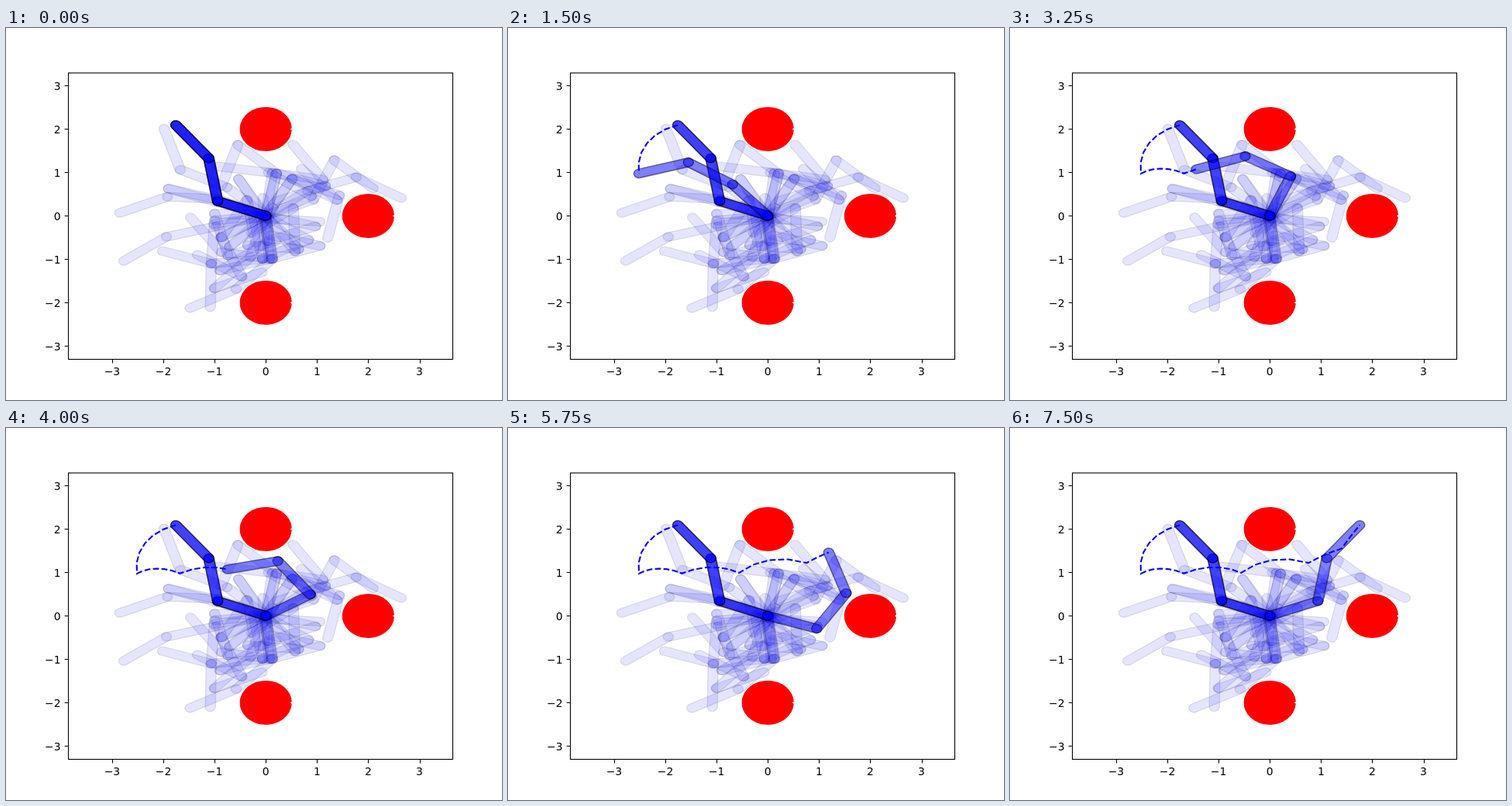
Write an HTML page with a canvas that moves like this. It is 640 px wide and 480 px high and loops after 7750 ms.

```html
<!DOCTYPE html>
<html>
<head>
<meta charset="utf-8">
<style>
  html, body { margin: 0; overflow: hidden; background: #fff; }
  canvas { display: block; }
</style>
</head>
<body>
<canvas id="stage" width="640" height="480"></canvas>
<script>
const ctx = document.getElementById('stage').getContext('2d');
const STEP = 250, STEPS = 31, RADIUS = 0.1;
const BLUE = '#0000ff';
const px = x => 335.2 + 66.1 * x;
const py = y => 242.4 - 56 * y;
const rad = deg => deg * Math.PI / 180;

// Absolute link angles (degrees) of the sampled poses.
const samples = [
  [139, 156, 108.6], [157.2, 177, 201.8], [161.7, 161.7, -15], [194, 194, 213.7],
  [-93.8, 186, 163], [185.9, -94, -91], [-82.2, 224.3, 205.8], [-107.6, 225.7, 21.8],
  [209.1, -66.2, 149.8], [-86, 195.2, 35], [35.4, 18.1, -28.6], [21.8, 65.9, -40.7],
  [59.1, -22.8, -103], [58.8, -29.3, 134], [82.6, -9.3, 125.7], [78, -17, 200],
  [78, 138.7, -109], [27, 147, 172], [122, -60, -170], [-83.8, 17.7, 166],
  [-33.5, 206, 100], [-55, 92, 215], [-50, 175, 60], [-14, 200, 95],
  [177, -75, 20], [210, 60, -80], [225, 40, -4], [-83, 171, 127]
];

// Path through joint space: step index, then relative joint angles.
const path = [
  [0, 160, -60, 30], [6, 133.5, 16, 45.5], [12, 78.2, 82, 39.6], [17, 17.3, 104.5, 67.2],
  [21, -27, 88.7, 65.8], [24, -12.2, 63.7, 49.7], [30, 20, 60, -30]
];

function poseAt(step) {
  const i = Math.max(1, path.findIndex(p => p[0] >= step));
  const a = path[i - 1], b = path[i];
  const u = (step - a[0]) / (b[0] - a[0]);
  let sum = 0;
  return [1, 2, 3].map(j => sum += a[j] + (b[j] - a[j]) * u);
}

function joints(angles) {
  const points = [[0, 0]];
  angles.forEach((deg, i) => {
    const [x, y] = points[i];
    points.push([x + Math.cos(rad(deg)), y + Math.sin(rad(deg))]);
  });
  return points;
}

function drawLink([x1, y1], [x2, y2], alpha) {
  const a = Math.atan2(y2 - y1, x2 - x1), q = Math.PI / 2;
  ctx.save();
  ctx.translate(px(0), py(0));
  ctx.scale(66.1, -56);
  ctx.beginPath();
  ctx.arc(x1, y1, RADIUS, a + q, a + 3 * q);
  ctx.arc(x2, y2, RADIUS, a - q, a + q);
  ctx.closePath();
  ctx.restore();
  ctx.globalAlpha = alpha;
  ctx.fillStyle = BLUE;
  ctx.fill();
  ctx.strokeStyle = '#000';
  ctx.lineWidth = 1.39;
  ctx.stroke();
  ctx.globalAlpha = 1;
}

function drawArm(angles, alpha) {
  const p = joints(angles);
  for (let i = 0; i < 3; i++) drawLink(p[i], p[i + 1], alpha);
}

function drawObstacle(x, y) {
  const gap = 0.05;
  ctx.fillStyle = '#ff0000';
  ctx.beginPath();
  ctx.ellipse(px(x), py(y), 33.6, 28.5, 0, gap, 2 * Math.PI - gap);
  ctx.lineTo(px(x) + 31.5, py(y));
  ctx.fill();
}

function drawAxes() {
  ctx.strokeStyle = ctx.fillStyle = '#000';
  ctx.lineWidth = 1.1;
  ctx.font = '13.9px "DejaVu Sans", sans-serif';
  ctx.strokeRect(80.5, 58, 496, 369.5);
  ctx.beginPath();
  for (let v = -3; v <= 3; v++) {
    const x = Math.round(px(v)) + 0.5, y = Math.round(py(v)) + 0.5;
    const label = String(v).replace('-', '\u2212');
    ctx.moveTo(x, 427.5);
    ctx.lineTo(x, 432.4);
    ctx.moveTo(80.5, y);
    ctx.lineTo(75.6, y);
    ctx.textAlign = 'center';
    ctx.fillText(label, px(v), 447.7);
    ctx.textAlign = 'right';
    ctx.fillText(label, 70.5, py(v) + 5.3);
  }
  ctx.stroke();
}

function drawTrail(step) {
  ctx.beginPath();
  for (let i = 0; i <= step; i++) {
    const [x, y] = joints(poseAt(i))[3];
    ctx.lineTo(px(x), py(y));
  }
  ctx.strokeStyle = BLUE;
  ctx.lineWidth = 2.08;
  ctx.setLineDash([7.7, 3.33]);
  ctx.stroke();
  ctx.setLineDash([]);
}

function draw(now) {
  const step = Math.floor(now / STEP) % STEPS;
  ctx.fillStyle = '#fff';
  ctx.fillRect(0, 0, 640, 480);
  samples.forEach(s => drawArm(s, 0.1));
  drawArm(poseAt(0), 0.75);
  drawArm(poseAt(step), 0.5);
  [[0, 2], [2, 0], [0, -2]].forEach(([x, y]) => drawObstacle(x, y));
  drawTrail(step);
  drawAxes();
}

let start;
function tick(now) {
  start ??= now;
  draw(now - start);
  requestAnimationFrame(tick);
}
draw(0);
requestAnimationFrame(tick);
</script>
</body>
</html>
```
